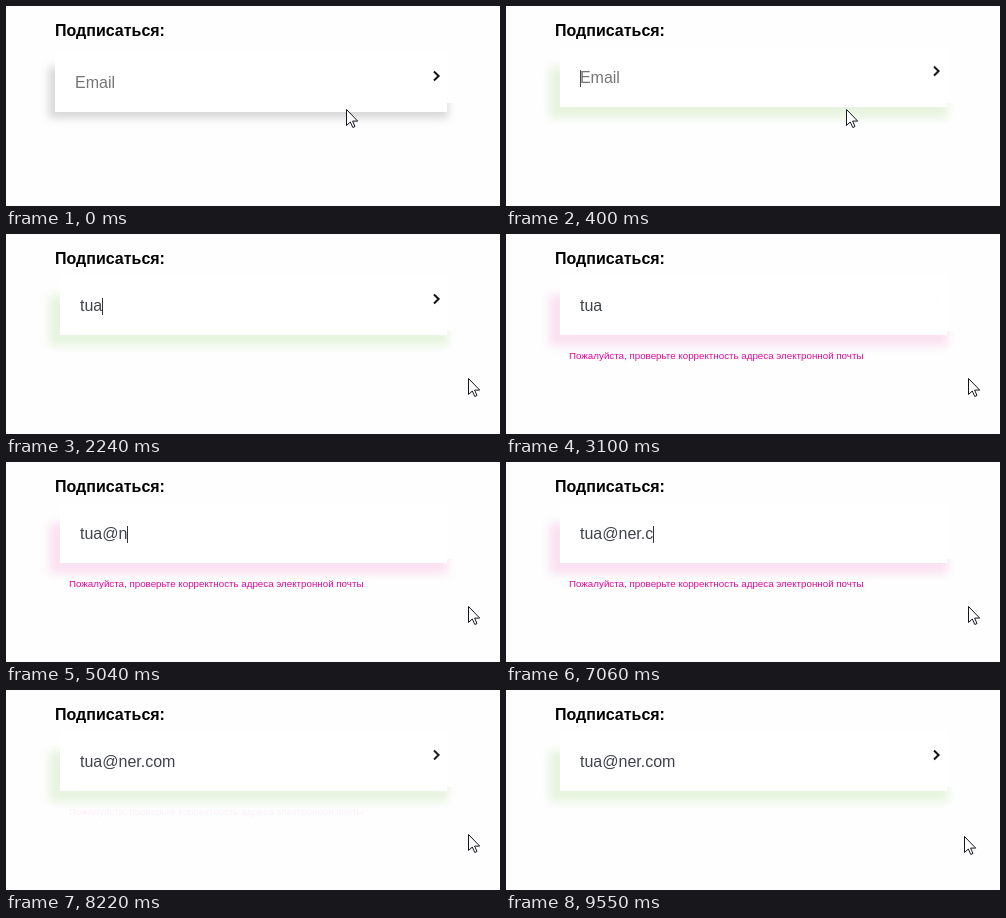
Write an HTML page that moves like this. It is 494 px wide and 200 px high and loops after 9620 ms.

```html
<!DOCTYPE html>
<html lang="ru">
<head>
<meta charset="utf-8">
<title>Подписаться</title>
<style>
  html, body { margin: 0; width: 100%; height: 100%; overflow: hidden; background: #fefefe; }
  svg { display: block; width: 494px; height: 200px; font-family: "Liberation Sans", Arial, sans-serif; }
  .title { font-weight: bold; font-size: 16px; }
  .shadow { filter: blur(4px); }
  .field { font-size: 16px; }
  .hint { fill: #757575; }
  .typed { fill: #40444a; }
  .error { font-size: 9.77px; fill: #e0069c; }
  .arrow path { fill: none; stroke: #111; stroke-width: 2; }
  .pointer { fill: #fff; stroke: #15151f; stroke-width: 1; }

  .shadow, .box, .field, .lift, .arrow, .error, .pointer {
    animation: 9620ms ease infinite;
  }
  .shadow { animation-name: tint; }
  .box { animation-name: box; }
  .field { animation-name: field; }
  .lift { animation-name: lift; }
  .arrow { animation-name: arrow; }
  .error { animation-name: error; }
  .pointer { animation-name: pointer; }

  @keyframes tint {
    0%, .83% { fill: #d6d6d6; }
    4.99%, 28.48% { fill: #e7f4df; }
    32.64%, 82.54% { fill: #fae2f1; }
    86.69%, 100% { fill: #e7f4df; }
  }
  @keyframes box {
    0%, .83% { transform: none; width: 392px; }
    4.99%, 100% { transform: translate(5px, -5px); width: 387px; }
  }
  @keyframes field {
    0%, .83% { transform: none; }
    4.99%, 100% { transform: translate(5px, -5px); }
  }
  @keyframes lift {
    0%, .83% { transform: none; }
    4.99%, 100% { transform: translateY(-5px); }
  }
  @keyframes arrow {
    0%, 28.48% { opacity: 1; }
    32.64%, 82.54% { opacity: 0; }
    86.69%, 100% { opacity: 1; }
  }
  @keyframes error {
    0%, 28.48% { opacity: 0; }
    32.64%, 82.54% { opacity: 1; }
    86.69%, 100% { opacity: 0; }
  }
  @keyframes pointer {
    0% { transform: translate(340px, 103px); }
    4.16% { transform: translate(340px, 103px); animation-timing-function: ease-in-out; }
    9.66% { transform: translate(466px, 160px); animation-timing-function: step-end; }
    10.49% { transform: translate(467px, 160px); animation-timing-function: step-end; }
    11.33% { transform: translate(467px, 158px); animation-timing-function: step-end; }
    12.88% { transform: translate(464px, 149px); animation-timing-function: step-end; }
    13.72% { transform: translate(462px, 144px); animation-timing-function: step-end; }
    98.44% { transform: translate(451px, 140px); animation-timing-function: step-end; }
    99.27%, 100% { transform: translate(458px, 146px); animation-timing-function: step-end; }
  }
</style>
</head>
<body>
<svg viewBox="0 0 494 200">
  <text class="title" x="49" y="30">Подписаться:</text>
  <rect class="shadow" x="43" y="61" width="399" height="51"/>
  <rect x="441" y="40" width="18" height="57" fill="#fefefe"/>
  <rect class="box" x="49" y="46" width="392" height="60" fill="#fff"/>
  <g class="field">
    <text class="hint" id="hint" x="69" y="82">Email</text>
    <text class="typed" id="typed" x="69" y="82"></text>
    <rect id="caret" x="69" y="69" width="1" height="17" fill="#333" visibility="hidden"/>
  </g>
  <g class="lift"><g class="arrow"><path d="M428 65.5l4.6 4.5l-4.6 4.5"/></g></g>
  <text class="error" x="63" y="125">Пожалуйста, проверьте корректность адреса электронной почты</text>
  <path class="pointer" d="M.5.5V16.5L4.3 13L6.8 18.5L9 17.5L6.6 12.1H11.7Z"/>
</svg>
<script>
  const LOOP = 9620;
  const address = "tua@ner.com";

  // When each character is typed, and when the caret blinks on or off
  const keys = [2010, 2090, 2240, 3940, 5040, 5190, 5270, 5500, 7060, 7360, 7440];
  const caretOn = [160, 1240, 2010, 3330, 3940, 5040, 6580, 8540];
  const caretOff = [700, 1780, 2790, 3860, 4490, 6050, 7990, 9070];

  const [hint, typed, caret] = ["hint", "typed", "caret"].map(id => document.getElementById(id));
  const passed = (times, t) => times.filter(x => x <= t).length;
  const show = (el, on) => el.setAttribute("visibility", on ? "visible" : "hidden");

  function draw(now) {
    const t = now % LOOP;
    const count = passed(keys, t);
    const text = address.slice(0, count);
    if (typed.textContent !== text) typed.textContent = text;
    const width = count ? typed.getComputedTextLength() : 0;
    caret.setAttribute("x", 69 + Math.floor(width));
    show(hint, !count);
    show(caret, passed(caretOn, t) > passed(caretOff, t));
  }

  let start;
  function tick(now) {
    start ??= now;
    draw(now - start);
    requestAnimationFrame(tick);
  }
  requestAnimationFrame(tick);
</script>
</body>
</html>
```
